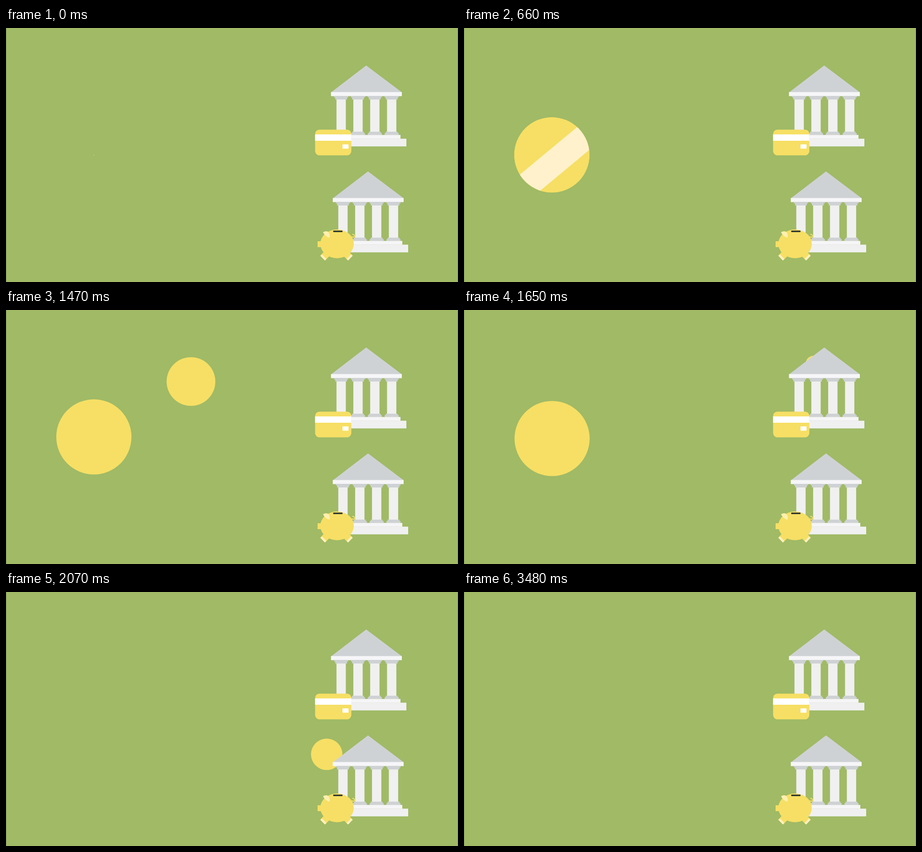
These frames come from a looping animation (998 by 561 pixels, 3510 ms). An HTML page:

```html
<!DOCTYPE html>
<html lang="en">
<head>
<meta charset="utf-8">
<title>Coins to banks</title>
<style>
  html, body { margin: 0; width: 100%; height: 100%; overflow: hidden; background: #a0ba66; }
  svg { display: block; width: 100%; height: 100%; }
</style>
</head>
<body>
<svg viewBox="0 0 998 561">
  <defs>
    <clipPath id="face"><circle cx="194" cy="280.3" r="83"/></clipPath>
    <g id="column">
      <path fill="#cfd2d4" d="M-15.5 150h31v3.500h-2.500v4.500h-26v-4.500h-2.500zM-13 229h26v3h2.500v4.500h-31v-4.500h2.500z"/>
      <path fill="#f0f0f0" d="M-10.300 158h20.600v71h-20.600z"/>
    </g>
    <g id="bank">
      <path fill="#cfd2d4" d="M795.300 82.700L874 142H718z"/>
      <path fill="#f6f6f8" d="M717.500 141.500h156.500v9h-156.500z"/>
      <use href="#column" x="740"/>
      <use href="#column" x="777.200"/>
      <use href="#column" x="814.400"/>
      <use href="#column" x="851.600"/>
      <path fill="#f5f5f7" d="M720 236.300h151v8.500h-151z"/>
      <path fill="#f0f0f1" d="M707 244.500h177v17h-177z"/>
    </g>
    <g id="leg">
      <path fill="#f6df64" d="M702 494l12 10-9.500 9.500-10.500-10.500z"/>
      <path fill="#fff0c0" d="M697.500 500l10 10-3.500 3.500-10-10.500z"/>
    </g>
  </defs>

  <rect width="998" height="561" fill="#a0ba66"/>
  <g fill="#f6df64">
    <circle id="lower"/>
    <circle id="upper"/>
  </g>
  <g clip-path="url(#face)">
    <rect id="shine" y="-100" height="200" width="56" fill="#fff1cb"/>
  </g>

  <use href="#bank"/>
  <rect x="682.500" y="224.500" width="80" height="56.700" rx="9.500" fill="#f6df64"/>
  <path fill="#fff" d="M682.500 235h80v14h-80z"/>
  <rect x="743" y="257" width="13.300" height="9.500" rx="1" fill="#fff"/>

  <use href="#bank" x="4" y="234"/>
  <path d="M763 461q7 3 6.500-2q-1-4-5-3" fill="none" stroke="#f6df64" stroke-width="2"/>
  <use href="#leg"/>
  <use href="#leg" transform="matrix(-1 0 0 1 1459.500 0)"/>
  <rect x="688" y="471" width="10" height="13" fill="#f6df64"/>
  <ellipse cx="731" cy="476.700" rx="37" ry="31.700" fill="#f6df64"/>
  <path d="M700 451q6-3.500 11-1q5 4 3.500 13q-10-2-14.500-12z" fill="#fff0b0"/>
  <rect x="722.500" y="447.500" width="20.500" height="3.200" rx=".8" fill="#25302f"/>

  <path fill="#839a53" d="M0 0h1v561h-1zM997 0h1v561h-1z"/>
</svg>
<script>
  const LOOP = 3510;
  const START = { x: 194, y: 280.3, r: 83 };
  const POP = [[0, 0], [210, 1.05], [300, 0.99], [360, 1]];
  const FLIGHTS = [
    { id: 'upper', from: 1200, to: 1660, x: 795, y: 118, r: 16, lift: -133 },
    { id: 'lower', from: 1644, to: 2108, x: 799, y: 352, r: 28, lift: 118 }
  ];
  const byId = id => document.getElementById(id);
  const clamp = v => Math.min(1, Math.max(0, v));
  const mix = (a, b, u) => a + (b - a) * u;

  function popScale(t) {
    for (let i = 1; i < POP.length; i++) {
      const [t0, a] = POP[i - 1], [t1, b] = POP[i];
      if (t < t1) return mix(a, b, Math.sin((t - t0) / (t1 - t0) * Math.PI / 2));
    }
    return 1;
  }

  // Across: accelerating. Up or down: an arc that bulges early.
  function drawCoin(f, t) {
    const s = clamp((t - f.from) / (f.to - f.from));
    const across = s * s + 0.04 * s * (1 - s);
    const coin = byId(f.id);
    coin.setAttribute('cx', mix(START.x, f.x, across));
    coin.setAttribute('cy', mix(START.y, f.y, across) + 2 * s * (1 - s) * f.lift);
    coin.setAttribute('r', s < 1 ? mix(START.r, f.r, s ** 1.57) * popScale(t) : 0);
  }

  function draw(t) {
    FLIGHTS.forEach(f => drawCoin(f, t));
    const edge = mix(-115, 76, (t - 450) / 390);
    const shine = byId('shine');
    shine.setAttribute('transform', `translate(194 280.3) rotate(50.3) translate(${edge} 0)`);
    shine.setAttribute('visibility', t > 360 && t < 900 ? 'visible' : 'hidden');
  }

  const begin = performance.now();
  function tick() {
    draw((performance.now() - begin) % LOOP);
    requestAnimationFrame(tick);
  }
  draw(0);
  requestAnimationFrame(tick);
</script>
</body>
</html>
```
